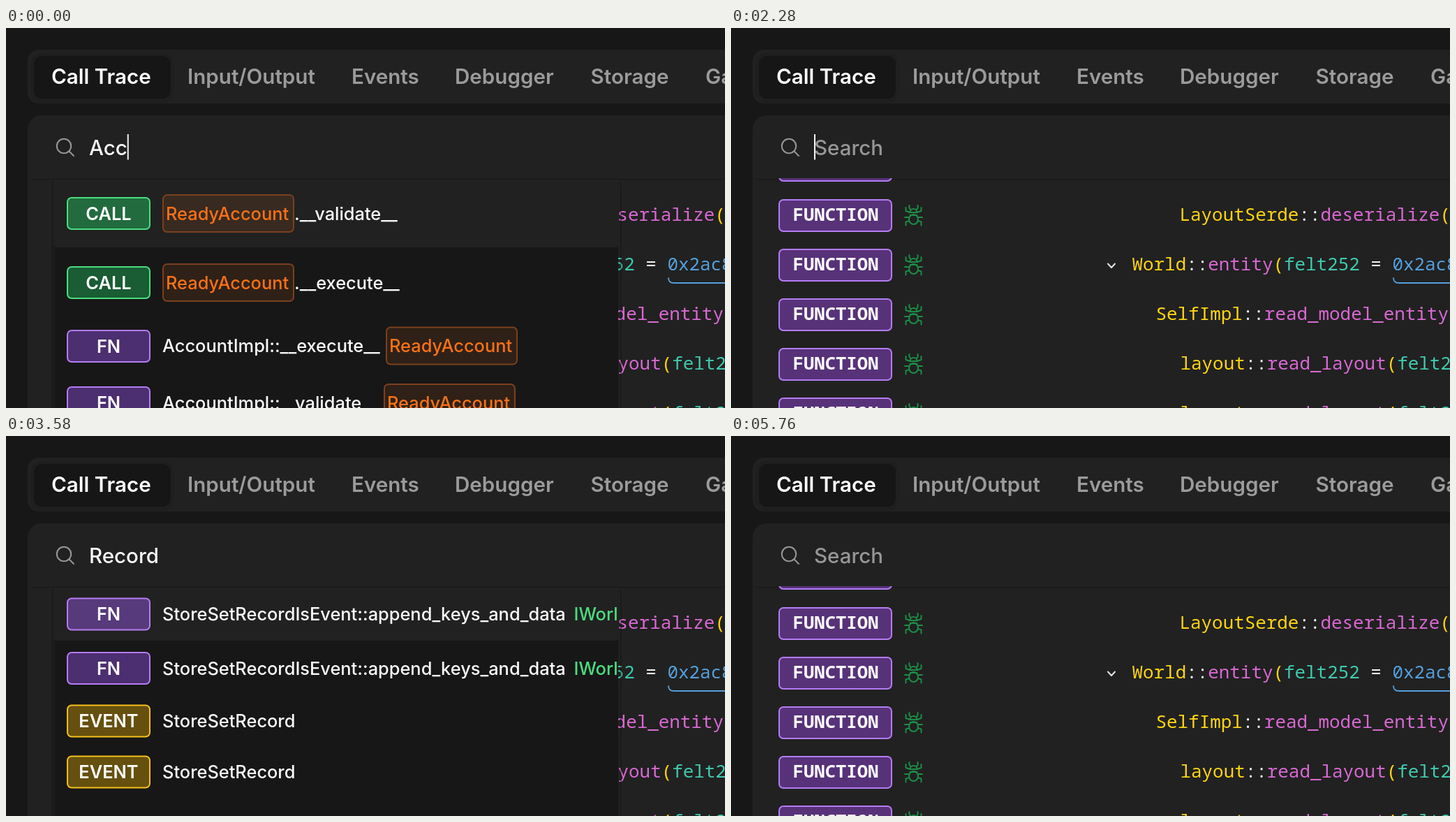
Animation, 1030 px wide and 544 px high, one loop 5.78 s. Source, as an HTML page:

```html
<!DOCTYPE html>
<html lang="en">
<head>
<meta charset="utf-8">
<title>Call trace search</title>
<style>
html, body { margin: 0; width: 100%; height: 100%; overflow: hidden; background: #171717; }
svg { display: block; width: 1030px; height: 544px; }
text { font-family: Inter, sans-serif; font-optical-sizing: none; white-space: pre; }
.tab { font-size: 29.6px; font-weight: 600; fill: #9b9b9b; }
.input { font-size: 29.5px; font-weight: 500; }
.item { font-size: 25.4px; font-weight: 500; fill: #fafafa; }
.tag { font-size: 25.4px; font-weight: 600; fill: #fff; text-anchor: middle; }
.code { font: 500 25.9px "Noto Sans Mono", "DejaVu Sans Mono", monospace; }
.fn { font: 600 25.6px "Noto Sans Mono", "DejaVu Sans Mono", monospace; fill: #fff; text-anchor: middle; }
</style>
</head>
<body>
<svg id="stage" viewBox="0 0 1030 544" xmlns="http://www.w3.org/2000/svg"></svg>
<script>
const LOOP = 5780, INPUT_X = 119;
const YELLOW = '#ffd511', PINK = '#d968d3', TEAL = '#3fcaae', BLUE = '#559fdc', WHITE = '#f4f4f4';
const ORANGE = '#fb7116', GREEN = '#4ade80';

const text = (cls, x, y, s, fill) =>
  `<text class="${cls}" x="${x}" y="${y}"${fill ? ` style="fill:${fill}"` : ''}>${s}</text>`;
const box = (x, y, w, h, r, fill, stroke = 'none') =>
  `<rect x="${x}" y="${y}" width="${w}" height="${h}" rx="${r}" fill="${fill}" stroke="${stroke}" stroke-width="2"/>`;
const line = (d, stroke, w = 2) =>
  `<path d="${d}" fill="none" stroke="${stroke}" stroke-width="${w}" stroke-linecap="round" stroke-linejoin="round"/>`;

// Call tree
const bug = y => `<g transform="translate(261.5 ${y})">` + line(
  'M-5-4a5 5 0 0 1 10 0zM-6.500 6a6.500 7 0 0 1 13 0a6.500 7 0 0 1-13 0z' +
  'M-4-8q-3-2-2-6M4-8q3-2 2-6M-5-4l-6-2v-5M5-4l6-2v-5' +
  'M-6 3h-6.500M6 3h6.500M-6 8l-5 1.500v5M6 8l5 1.500v5M-5 0h10', '#1d8c45') + '</g>';
const badge = y => box(69, y - 22, 161, 45, 6, '#573279', '#b57cf5');
const code = (x, y, parts) => `<text class="code" x="${x}" y="${y}">` +
  parts.map(([c, s]) => `<tspan fill="${c}">${s}</tspan>`).join('') + '</text>';

const path = (owner, fn) => [[YELLOW, owner], [WHITE, '::'], [PINK, fn]];
const layoutCall = [...path('layout', 'read_layout'), [YELLOW, '('], [TEAL, 'felt252']];
const calls = [
  [642.5, [...path('LayoutSerde', 'deserialize'), [YELLOW, '(']]],
  [574.5, [...path('World', 'entity'), [YELLOW, '('], [TEAL, 'felt252'], [WHITE, ' = '], [BLUE, '0x2ac8']]],
  [608.5, path('SelfImpl', 'read_model_entity')],
  [643.5, layoutCall],
  [643.5, layoutCall]
];
const tree = '<g clip-path="url(#below)">' + badge(196) + calls.map(([x, parts], i) => {
  const y = 268 + 71 * i;
  return badge(y) + text('fn', 150, y + 8, 'FUNCTION') + bug(y) + code(x, y + 8, parts);
}).join('') + line('M540 337.500l5 5.500l5-5.500', '#e4e4e4') +
  line('M949 358q0 7 8 7H1032', BLUE, 1.8) + '</g>';

// Suggestions
const TAGS = {
  CALL: ['#1a5c34', '#226b3f', GREEN],
  FN: ['#4c2f70', '#573a7b', '#b57cf5'],
  EVENT: ['#66500f', '#66500f', '#f5c01c']
};
const tag = (y, name, hot) => {
  const [fill, lit, edge] = TAGS[name];
  return box(88, y - 22, 118, 45, 6, hot ? lit : fill, edge) + text('tag', 147, y + 9.5, name);
};
const chip = (x, y) => box(x + 1, y - 26, 187, 53, 6, 'rgba(249,115,22,.1)', '#7b401c') +
  text('item', x + 5, y + 9.5, 'ReadyAccount', ORANGE);
const label = (y, s) => text('item', 224, y + 9.5, s);
const world = (x, y) => text('item', x, y + 9.5, 'IWorld', GREEN);
const method = (y, s, hot) => tag(y, 'CALL', hot) + chip(224, y) + text('item', 413, y + 9.5, s);
const append = (y, hot) => tag(y, 'FN', hot) +
  label(y, 'StoreSetRecordIsEvent::append_keys_and_data') + world(813.5, y);
const event = y => tag(y, 'EVENT') + label(y, 'StoreSetRecord');

const menu = (id, split, rows) => `<g id="${id}">` +
  box(66, 222, 815, 340, 4, 'none', 'rgba(18,18,18,.4)') +
  box(66, 215, 811, 340, 0, '#1c1c1c') + box(70, 217, 807, 340, 0, '#171717') +
  `<path d="M68 217H877V${split - 4}q0 4-4 4H74q-6 0-6-6z" fill="#212121"/>` +
  `<g clip-path="url(#menuClip)">${rows}</g></g>`;

const menus = {
  account: menu('account', 314, method(265, '.__validate__', true) + method(364, '.__execute__') +
    tag(455, 'FN') + label(454, 'AccountImpl::__execute__') + chip(544, 454.5) +
    tag(536, 'FN') + label(536, 'AccountImpl::__validate__') + chip(541, 536)),
  read: menu('read', 315, method(265.5, '.__validate__', true) + method(364.5, '.__execute__') +
    tag(453, 'FN') + label(452.5, 'StoreResource::read') + world(484.5, 452.5) + append(530)),
  record: menu('record', 293, append(254.5, true) + append(332) + event(407.5) + event(480.5))
};

// Page
const tabs = [[260, 'Input/Output'], [495, 'Events'], [643, 'Debugger'], [837.5, 'Storage'], [1002, 'Gas']];
const stage = document.getElementById('stage');
stage.innerHTML = `<defs>
  <clipPath id="below"><rect y="215" width="1030" height="329"/></clipPath>
  <clipPath id="menuClip"><rect x="66" y="217" width="811" height="327"/></clipPath>
  <filter id="soft" x="-10%" y="-20%" width="120%" height="140%"><feGaussianBlur stdDeviation="2"/></filter>
</defs>` +
  box(0, 0, 1030, 544, 0, '#171717') +
  box(31, 31, 1040, 77, 16, '#212121') +
  `<g filter="url(#soft)">${box(39, 40, 198, 63, 12, '#1a1a1a')}</g>` + box(40, 40, 196, 61, 12, '#161616') +
  text('tab', 65, 80, 'Call Trace', '#fff') + tabs.map(([x, s]) => text('tab', x, 80, s)).join('') +
  box(31, 125, 1040, 480, 20, '#212121') +
  box(35, 216, 1000, 1.5, 0, '#1b1b1b') +
  '<circle cx="83" cy="169" r="10.2" fill="none" stroke="#979797" stroke-width="2"/>' +
  line('M90.500 176.500L97 183', '#979797') +
  '<rect id="selection" x="119" y="152" height="36.500" fill="#2c93bd"/>' +
  `<text id="query" class="input" x="${INPUT_X}" y="181.500"></text>` +
  '<rect id="caret" y="152" width="2" height="36.500" fill="#f4f4f4"/>' +
  tree + Object.values(menus).join('');

const $ = id => document.getElementById(id);
const query = $('query'), caret = $('caret'), selection = $('selection');
const show = (el, on) => el.setAttribute('display', on ? 'inline' : 'none');

// start time, text, menu, selected
const steps = [
  [0, 'Acc', 'account'], [100, 'Acco', 'account'], [200, 'Accou', 'account'],
  [300, 'Accoun', 'account'], [400, 'Account', 'account'], [1220, 'Account', 'account', true],
  [1840, '', ''],
  [2420, 'R', 'read'], [2520, 'Re', 'read'], [2640, 'Rec', 'record'], [2760, 'Reco', 'record'],
  [2880, 'Recor', 'record'], [3000, 'Record', 'record'], [4160, 'Record', 'record', true],
  [5340, '', '']
];
const caretOff = [[820, 1220], [2300, 2420], [3400, 3800], [5740, LOOP]];

function render(t) {
  const [, typed, open, selected] = steps.filter(s => s[0] <= t).pop();
  const value = typed || 'Search';
  if (query.textContent !== value) query.textContent = value;
  query.setAttribute('fill', selected ? '#101318' : typed ? '#fafafa' : '#979797');
  const width = typed ? query.getComputedTextLength() : 0;
  selection.setAttribute('width', width);
  show(selection, selected);
  caret.setAttribute('x', INPUT_X + width);
  show(caret, !selected && !caretOff.some(([a, b]) => t >= a && t < b));
  for (const id in menus) show($(id), id === open);
}

const start = performance.now();
function tick() {
  render((performance.now() - start) % LOOP);
  requestAnimationFrame(tick);
}
tick();
</script>
</body>
</html>
```
